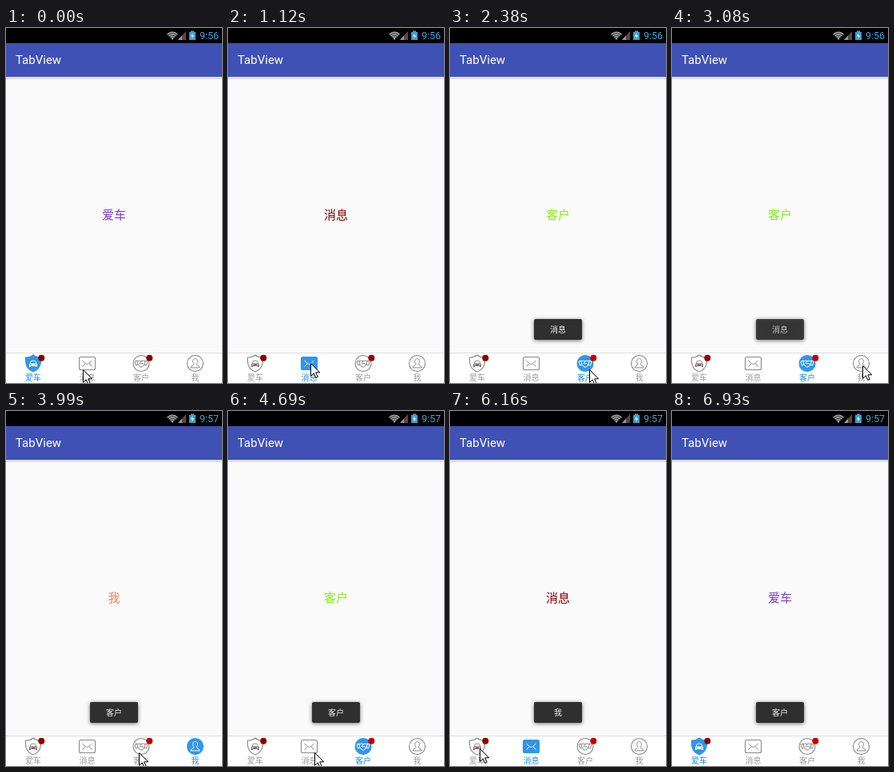
These frames come from a looping animation (270x444 px, 7.77 s). An HTML page with a canvas:

```html
<!DOCTYPE html>
<html lang="zh">
<head>
<meta charset="utf-8">
<title>TabView</title>
<style>
html, body { margin: 0; width: 100%; height: 100%; overflow: hidden; background: #fafafa; }
canvas { display: block; }
</style>
</head>
<body>
<canvas id="stage" width="270" height="444"></canvas>
<script>
const ctx = document.getElementById('stage').getContext('2d');
const LOOP = 7770, TICK = 70;
const PRESS = 140, MOVE = 350;
const TOAST_START = 1190, TOAST_PERIOD = 1830, TOAST_FADE = 260;
const CJK = '"Noto Sans CJK SC", "Noto Sans CJK", sans-serif';
const BLUE = '#3096ea', GREY = '#888', PAPER = '#fff';

const tabs = [
  { label: '爱车', color: '#7c38d4', badge: true },
  { label: '消息', color: '#8b0000' },
  { label: '客户', color: '#7ff010', badge: true },
  { label: '我', color: '#f97f55' }
];

const clicks = [
  { at: 980, tab: 1 }, { at: 2170, tab: 2 }, { at: 3150, tab: 3 },
  { at: 4130, tab: 2 }, { at: 4760, tab: 1 }, { at: 6440, tab: 0 }
];
const toasts = clicks.slice(0, 4).map((click, i) => ({
  label: tabs[click.tab].label,
  start: TOAST_START + i * TOAST_PERIOD
}));

// Pointer stops: [departure, x, y]; each trip takes MOVE ms.
const home = [96, 427];
const stops = [
  [140, 115, 422], [490, 103, 419], [1400, 166, 424], [1750, 174, 427], [2590, 238, 422],
  [3640, 166, 427], [4340, 108, 427], [4970, 89, 423], [5740, 37, 422], [6580, 36, 446]
];

const shapes = {
  shield: new Path2D('M0-10.5C3-8 6-7.3 9.5-7.5C10 2 8 7 0 10.5C-8 7-10 2-9.5-7.5C-6-7.3-3-8 0-10.5Z'),
  roof: new Path2D('M-3.8 .5Q-3.2-3.3-1.8-3.3H1.8Q3.2-3.3 3.8 .5'),
  car: new Path2D('M-5 1.5Q-5 0-3.5 0H3.5Q5 0 5 1.5V4.5H3.2V3.6H-3.2V4.5H-5Z'),
  lamps: new Path2D('M-3.8 1.2h1.6v1.2h-1.6ZM2.2 1.2h1.6v1.2h-1.6Z'),
  flap: new Path2D('M-6-3.5L-2 .2Q0 1.6 2 .2L6-3.5M-6 4L-2.6 .6M6 4L2.6 .6'),
  hands: new Path2D('M-8-2.5L-5.5-3.5L-4 1.5L-6.5 2.5ZM8-2.5L5.5-3.5L4 1.5L6.5 2.5Z' +
    'M-5.2-2.8L-1.5-3.5L0-2.8L2-3.5L5.2-2.8M0-2.8L-2 0Q-.5 1.2 1-.5L4.2 2' +
    'M-4.2 1.5L-1 4.5Q0 5 1 4.2L4.2 2'),
  person: new Path2D('M0-6C3.6-6 3.6-1 1.5 .6C1.5 2.8 5.2 2.2 5.5 5.4H-5.5C-5.2 2.2-1.5 2.8-1.5 .6C-3.6-1-3.6-6 0-6Z'),
  arrow: new Path2D('M.5 .5V16.3L4.2 12.8L6.8 18.5L9.2 17.5L6.7 11.8H11.7Z')
};

const clamp = p => Math.min(1, Math.max(0, p));
const easeOut = p => 1 - (1 - p) ** 1.6;
const smooth = p => p * p * (3 - 2 * p);

function text(str, x, y, font, color, align = 'center') {
  ctx.font = font;
  ctx.fillStyle = color;
  ctx.textAlign = align;
  ctx.fillText(str, x, y);
}

function rect(x, y, w, h, color) {
  ctx.fillStyle = color;
  ctx.fillRect(x, y, w, h);
}

function disc(x, y, r, color) {
  ctx.fillStyle = color;
  ctx.beginPath();
  ctx.arc(x, y, r, 0, 7);
  ctx.fill();
}

function arc(x, y, r, color, from = 0, to = 7) {
  ctx.strokeStyle = color;
  ctx.beginPath();
  ctx.arc(x, y, r, from, to);
  ctx.stroke();
}

function fillPath(d, color) {
  ctx.fillStyle = color;
  ctx.fill(new Path2D(d));
}

function selectedAt(t) {
  const done = clicks.filter(click => click.at + PRESS <= t);
  return done.length ? done[done.length - 1].tab : 0;
}

function pointerAt(t) {
  return stops.reduce(([x, y], [start, toX, toY]) => {
    const p = easeOut(clamp((t - start) / MOVE));
    return [x + (toX - x) * p, y + (toY - y) * p];
  }, home).map(Math.round);
}

function drawBars(t) {
  rect(0, 0, 270, 444, '#fafafa');
  const shade = ctx.createLinearGradient(0, 61, 0, 65);
  shade.addColorStop(0, 'rgba(0,0,0,.18)');
  shade.addColorStop(1, 'rgba(0,0,0,0)');
  rect(0, 61, 270, 4, shade);
  rect(0, 0, 270, 19, '#000');
  rect(0, 19, 270, 42, '#3f51b5');
  rect(0, 406, 270, 1, '#dedede');
  rect(0, 407, 270, 37, PAPER);
  text('TabView', 12, 45, '15px Roboto, sans-serif', '#fff', 'left');

  ctx.lineWidth = 1.9;
  for (let r = 3.5; r < 9; r += 2.5) arc(208, 14, r, '#999', -2.42, -0.72);
  disc(208, 13, 1.5, '#999');
  fillPath('M215 15L225 4V15Z', '#5a4648');
  fillPath('M215 15L220 9.5V15Z', '#999');
  fillPath('M229 5H231V3.5H235V5H237V15H229Z', '#3a9fd0');
  fillPath('M233.5 6L231 10.5H233L232.3 14L235 9.2H233Z', '#fff');
  text(t < 3220 ? '9:56' : '9:57', 266, 14, '12.5px Roboto, sans-serif', '#33a8e0', 'right');
}

function drawIcon(i, active) {
  const line = active ? '#fff' : GREY;
  const frame = i ? new Path2D() : shapes.shield;
  if (i === 1) frame.roundRect(-10, -8, 20, 16, 2);
  if (i > 1) frame.arc(0, 0, 10, 0, 7);
  ctx.fillStyle = active ? BLUE : PAPER;
  ctx.strokeStyle = active ? BLUE : GREY;
  ctx.lineWidth = 1.1;
  ctx.fill(frame);
  ctx.stroke(frame);
  ctx.strokeStyle = line;
  ctx.lineWidth = 1;
  ctx.stroke([shapes.roof, shapes.flap, shapes.hands, shapes.person][i]);
  if (i === 0) {
    ctx.fillStyle = active ? '#fff' : '#806a70';
    ctx.fill(shapes.car);
    ctx.fillStyle = active ? BLUE : PAPER;
    ctx.fill(shapes.lamps);
  }
}

function drawTabs(t) {
  tabs.forEach((tab, i) => {
    const x = 34 + i * 67.5, active = i === selectedAt(t);
    ctx.save();
    ctx.translate(x, 419.5);
    drawIcon(i, active);
    ctx.restore();
    if (tab.badge) disc(x + 10.3, 412.8, 4, i === 2 && t >= 2310 ? '#c40000' : '#8b0000');
    text(tab.label, x, 441, '10px ' + CJK, active ? '#1c8cd8' : '#999');
  });
}

function drawToast(label, alpha) {
  if (alpha <= 0) return;
  ctx.save();
  ctx.globalAlpha = alpha;
  ctx.shadowColor = 'rgba(0,0,0,.55)';
  ctx.shadowBlur = 5;
  ctx.shadowOffsetY = 1;
  ctx.fillStyle = '#2f2f2f';
  ctx.beginPath();
  ctx.roundRect(105, 364, 60, 26, 2);
  ctx.fill();
  ctx.shadowColor = 'transparent';
  text(label, 135, 381, '10px ' + CJK, '#f2f2f2');
  ctx.restore();
}

function drawToasts(t) {
  const shown = toast => toast ? smooth(clamp((t - toast.start) / TOAST_FADE)) : 0;
  toasts.forEach((toast, i) => drawToast(toast.label, shown(toast) * (1 - shown(toasts[i + 1]))));
}

function drawPointer(t) {
  const [x, y] = pointerAt(t);
  ctx.save();
  ctx.translate(x, y);
  ctx.lineWidth = 1;
  if (clicks.some(({ at }) => t >= at && t < at + PRESS)) {
    arc(-4.5, -4.5, 12, '#000');
    arc(-4.5, -4.5, 11, '#fff');
  }
  ctx.fillStyle = '#fff';
  ctx.strokeStyle = '#000';
  ctx.fill(shapes.arrow);
  ctx.stroke(shapes.arrow);
  ctx.restore();
}

function draw(time) {
  const t = Math.floor((time % LOOP) / TICK) * TICK;
  const { label, color } = tabs[selectedAt(t)];
  drawBars(t);
  text(label, 135, 239, '500 15px ' + CJK, color);
  drawTabs(t);
  drawToasts(t);
  drawPointer(t);
}

const began = performance.now();
function tick() {
  draw(performance.now() - began);
  requestAnimationFrame(tick);
}
tick();
</script>
</body>
</html>
```
